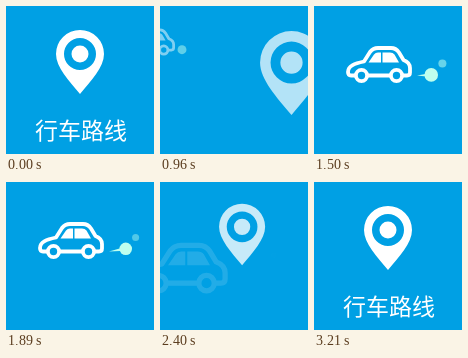
An HTML page for the animation above (3450 ms loop, 148 px wide and 148 px high).

```html
<!DOCTYPE html>
<html lang="zh">
<head>
<meta charset="utf-8">
<style>
  html, body { margin: 0; height: 100%; overflow: hidden; background: #00a0e4; }
  svg { display: block; width: 100%; height: 100%; }
  text { font: 300 23px "Noto Sans CJK SC", "Noto Sans CJK", sans-serif; text-anchor: middle; }
</style>
</head>
<body>
<svg viewBox="0 0 148 148" fill="#fff">
  <g id="car">
    <g fill="none" stroke="#fff" stroke-width="3.8" stroke-linecap="round" stroke-linejoin="round">
      <path d="M41 69.500H37Q34 69.500 34 66C34 59.500 41 57.500 50 55.500L56 46Q59 42 64 42H77Q82 42 85 46.500L89.500 54Q96 56.500 96 62V66.500Q96 69.500 93 69.500H89M54 69.500H76"/>
      <circle cx="47.500" cy="69.500" r="5.600"/>
      <circle cx="82.500" cy="69.500" r="5.600"/>
    </g>
    <path d="M54.500 56.500L60 48.500Q61.500 46.500 64 46.500H67V56.500ZM68.500 46.500H76Q79 46.500 80.500 48.500L85 56.500H68.500Z"/>
    <g id="puffs" fill="#beffee"></g>
  </g>
  <path id="pin" fill-rule="evenodd" d="M-24-8A24 24 0 0 1 24-8C24 5 11 19 0 32C-11 19-24 5-24-8ZM-16-8a16 16 0 0 0 32 0a16 16 0 0 0-32 0ZM-8.500-8a8.500 8.500 0 0 0 17 0a8.500 8.500 0 0 0-17 0Z"/>
  <text id="label" x="75" y="133">行车路线</text>
</svg>
<script>
const LOOP = 3450, STEP = 30, BEAT = 300;
const SWAP_TO_CAR = 660, SWAP_TO_PIN = 1890;
const [car, pin, label, puffs] = ['car', 'pin', 'label', 'puffs']
  .map(id => document.getElementById(id));
const clamp = v => Math.min(1, Math.max(0, v));

const carHome = { x: 65, y: 58.5 }, pinHome = { x: 74, y: 56 };

function place(el, x, y, scale, opacity, origin = '') {
  el.setAttribute('transform', `translate(${x} ${y}) scale(${scale}) ${origin}`);
  el.setAttribute('opacity', clamp(opacity));
}

// Leaving: drift forward, growing and fading; k counts beats since the swap
function leave(home, dx, dy, grow, k) {
  k = Math.max(0, k);
  return [home.x + dx * k, home.y + dy * k, 1 + grow * k, 1 - .3 * k * k];
}

// Entering: come from far away and arrive after two beats
function enter(home, dx, dy, shrink, fade, k) {
  const r = Math.max(0, 2 - k);
  return [home.x + dx * r, home.y + dy * r, Math.max(0, 1 - shrink * r), 1 - fade * r];
}

// Exhaust cloud: shot out of the pipe, then rising and shrinking
function puff(u) {
  if (u <= 0 || u >= 1) return '';
  const rise = Math.max(0, u - .33);
  const x = 103 + 28.5 * Math.sin(u * Math.PI / 2), y = 69 - 31 * rise;
  const r = 6.8 * Math.min(1, u * 9) - 7.5 * rise;
  const tail = u < .42 ? `<path d="M103 69.500L${x} ${y - 2}V${y + 2}Z"/>` : '';
  return `<g opacity="${clamp(1.8 * (1 - u))}">${tail}<circle cx="${x}" cy="${y}" r="${r}"/></g>`;
}

function draw(t) {
  const toCar = (t - SWAP_TO_CAR) / BEAT, toPin = (t - SWAP_TO_PIN) / BEAT;
  const pinPose = toPin < 0
    ? leave(pinHome, 57.5, 11, .31, toCar)
    : enter(pinHome, 27, -11.5, .45, .75, toPin);
  const carPose = toPin < 0
    ? enter(carHome, -74, -22.5, .27, .5, toCar)
    : leave(carHome, -25, 16.2, .22, toPin);
  pinPose[2] += .19 * Math.sin(Math.PI * clamp((t - 2340) / 360));
  place(pin, ...pinPose);
  place(car, ...carPose, 'translate(-65 -58.5)');

  puffs.innerHTML = [0, 1, 2].map(i => puff((t - 870 - 330 * i) / 900)).join('');

  const gone = clamp((t - 210) / 180), back = clamp((t - 2820) / 390);
  const fade = t < 690 ? 1 - .9 * gone : back;
  place(label, 0, t < 690 ? 8 * gone : 0, 1, fade);
}

const start = performance.now();
function tick() {
  const t = (performance.now() - start) % LOOP;
  draw(Math.floor(t / STEP) * STEP);
  requestAnimationFrame(tick);
}
tick();
</script>
</body>
</html>
```
